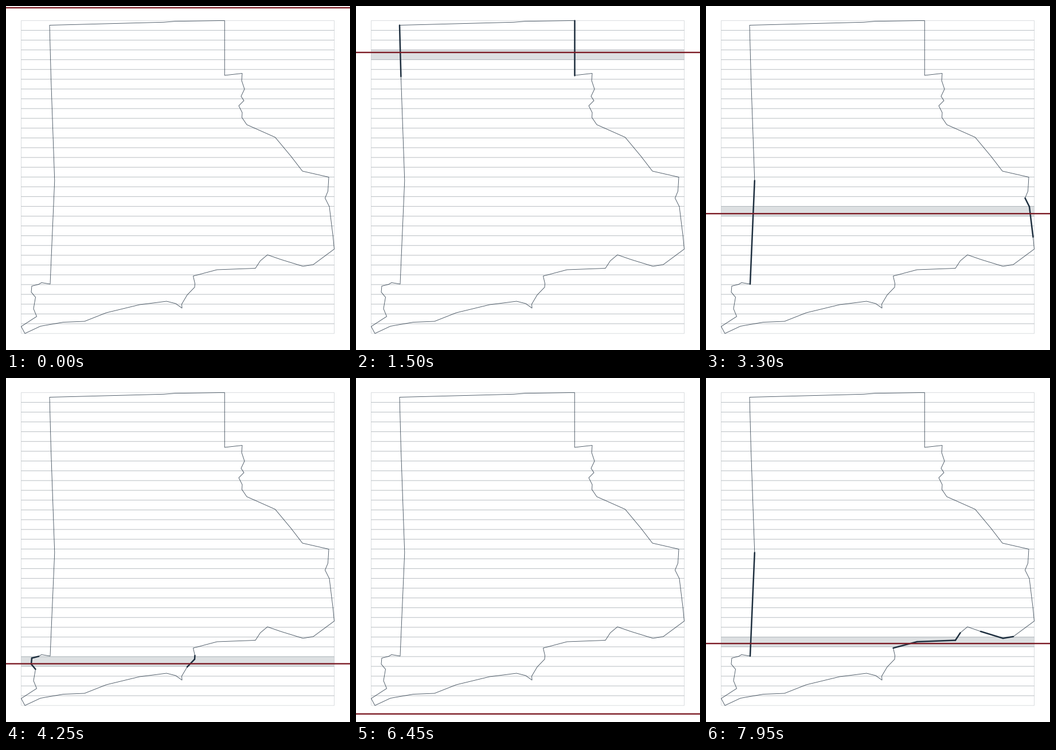
These frames come from a looping animation (600 by 600 pixels, 8 s). A matplotlib script:

```python
import numpy as np
import matplotlib.pyplot as plt
from matplotlib.animation import FuncAnimation
from matplotlib.collections import LineCollection
from matplotlib.patches import Polygon, Rectangle

SIZE, DPI = 600, 100
STEP, FRAMES = 50, 160
NAVY, RED = "#1e2f3f", "#7d1d27"
LEFT, RIGHT, TOP, BOTTOM = 26.5, 572.5, 25.4, 571.2
BANDS = 32
BAND_H = (BOTTOM - TOP) / BANDS
Y_MIN, Y_MAX = 3, 594
T_START, SWEEP = -40, 5995

# Key corners of the outline, clockwise from the top left
NORTH = [(76, 33.5), (275, 28.3), (295, 26.7), (381.3, TOP), (381.3, 121)]
EAST = [(412, 117.5), (411, 130), (416, 145), (410, 157.5), (415, 165),
        (406, 174), (412, 186), (411.5, 194.5), (420, 207), (469.5, 229),
        (497, 262), (517, 288), (563, 298.5), (561.5, 323), (556.5, 335),
        (564, 350), (570.5, 403), (RIGHT, 424)]
SOUTH = [(536, 451), (518, 454), (479, 442), (456, 434), (443.5, 444.5),
         (435, 457.5), (368, 460), (326.5, 471), (329.5, 484), (329, 490.5),
         (316, 504), (306.5, 520), (307, 527), (296, 519), (280, 515),
         (233, 521), (175, 535), (137, 550), (100, 551.5), (60, 558.5),
         (33, BOTTOM)]
WEST = [(LEFT, 559), (53.5, 541.5), (48, 528), (51.5, 508), (44, 499),
        (45, 488.5), (57, 485.5), (62, 482.5), (77, 485), (84.8, 304.5),
        (78.4, 123)]
outline = np.array(NORTH + EAST + SOUTH + WEST)
edges = np.stack([outline, np.roll(outline, -1, axis=0)], axis=1)
edge_top = edges[:, :, 1].min(axis=1)
edge_bottom = edges[:, :, 1].max(axis=1)


def px(width):
    return width * 72 / DPI


def ease(u):
    return 2 * u * u if u < 0.5 else 1 - 2 * (1 - u) ** 2


def sweep_y(t):
    u = (t - T_START) / SWEEP
    return Y_MIN + (Y_MAX - Y_MIN) * ease(min(u, 2 - u))


fig = plt.figure(figsize=(SIZE / DPI, SIZE / DPI), dpi=DPI, facecolor="white")
ax = fig.add_axes([0, 0, 1, 1])
ax.set_xlim(0, SIZE)
ax.set_ylim(SIZE, 0)
ax.axis("off")

for k in range(BANDS):
    ax.add_patch(Rectangle((LEFT, TOP + k * BAND_H), RIGHT - LEFT, BAND_H,
                           fill=False, ec=NAVY, lw=px(1), alpha=0.16,
                           snap=False, zorder=1))
band = Rectangle((LEFT, TOP), RIGHT - LEFT, BAND_H, fc=NAVY, ec="none",
                 alpha=0.15, snap=False, zorder=2)
ax.add_patch(band)
ax.add_patch(Polygon(outline, closed=True, fill=False, ec=NAVY, lw=px(0.9),
                     alpha=0.82, snap=False, zorder=3))
active = LineCollection([], colors=NAVY, linewidths=px(2.5),
                        capstyle="round", zorder=4)
ax.add_collection(active, autolim=False)
sweep, = ax.plot([-5, SIZE + 5], [Y_MIN, Y_MIN], color=RED, lw=px(2.4),
                 snap=False, zorder=5)


def draw(i):
    y = sweep_y(i * STEP)
    sweep.set_ydata([y, y])
    inside = TOP <= y < BOTTOM
    band.set_visible(inside)
    active.set_visible(inside)
    if inside:
        top = TOP + int((y - TOP) / BAND_H) * BAND_H
        band.set_y(top)
        hit = (edge_bottom >= top) & (edge_top <= top + BAND_H)
        active.set_segments(edges[hit])
    return band, active, sweep


anim = FuncAnimation(fig, draw, frames=FRAMES, interval=STEP, repeat=True,
                     repeat_delay=0, blit=False)
plt.show()
```
